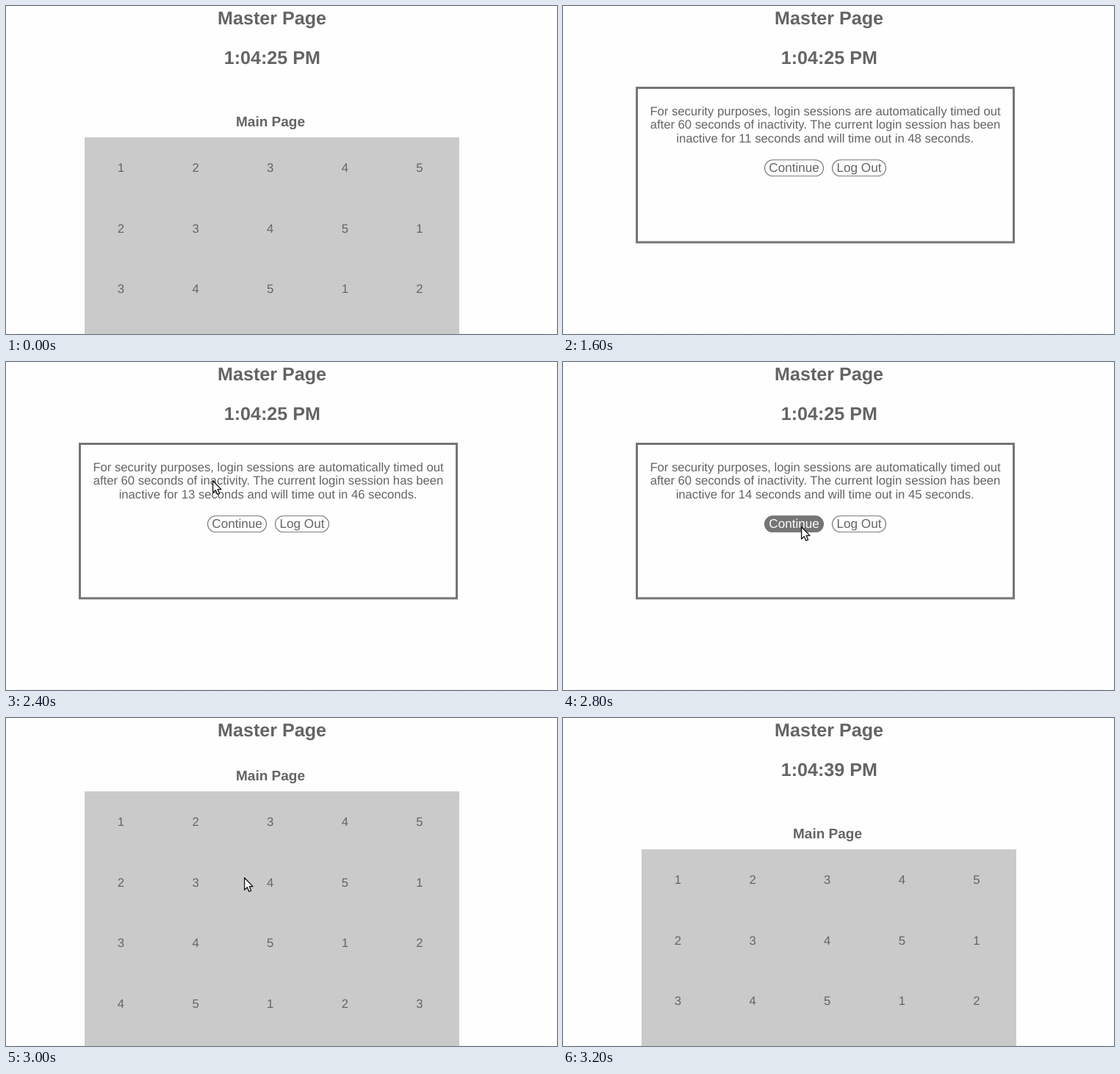
These frames come from a looping animation (750x447 px, 3.8 s). An HTML page:

```html
<!DOCTYPE html>
<html lang="en">
<head>
<meta charset="utf-8">
<title>Session timeout</title>
<style>
  html, body { margin: 0; width: 100%; height: 100%; overflow: hidden; background: #fefefe; }
  svg { display: block; width: 750px; height: 447px; }
  text {
    font: 16.65px "Liberation Sans", Arial, sans-serif;
    fill: #646464;
    text-anchor: middle;
    text-rendering: geometricPrecision;
  }
  .h1 { font-size: 25.1px; font-weight: bold; }
  .h3 { font-size: 19px; font-weight: bold; }
  .btn text { font-size: 17.1px; }
  .btn rect { fill: #fefefe; stroke: #757575; stroke-width: 1.1; }
  .hover rect { fill: #757575; }
  .hover text { fill: #fefefe; }
</style>
</head>
<body>
<svg viewBox="0 0 750 447">
  <text class="h1" x="362" y="25">Master Page</text>
  <text class="h1" id="clock" x="362.3" y="79"></text>

  <g id="page">
    <path d="M12 446.5H737" stroke="#f1f1f8"/>
    <g id="main">
      <text class="h3" x="360" y="164">Main Page</text>
      <rect x="107" y="179" width="510" height="420" fill="#cacaca"/>
      <g id="cells"></g>
    </g>
  </g>

  <g id="dialog">
    <path d="M11 446.5H738" stroke="#ececec" stroke-dasharray="2 1"/>
    <rect x="100.5" y="111.5" width="513" height="210.5" fill="#fefefe" stroke="#757575" stroke-width="3"/>
    <text x="357" y="148.5">For security purposes, login sessions are automatically timed out</text>
    <text x="357" y="167">after 60 seconds of inactivity. The current login session has been</text>
    <text id="count" x="356.7" y="186"></text>
    <g class="btn" id="go">
      <rect x="274.5" y="209.8" width="80" height="22" rx="11"/>
      <text x="314.5" y="226.2">Continue</text>
    </g>
    <g class="btn">
      <rect x="366.5" y="209.8" width="73" height="22" rx="11"/>
      <text x="403" y="226.2">Log Out</text>
    </g>
  </g>

  <path id="cursor" d="M.6 .8V17.2L4.3 13.8L6.8 19.5L9.6 18.3L7.2 12.6H12Z"
        fill="#fff" stroke="#111" stroke-width="1.3" stroke-linejoin="round"/>
</svg>
<script>
const $ = id => document.getElementById(id);
const show = (id, on) => $(id).setAttribute("visibility", on ? "visible" : "hidden");
const LOOP = 3800;

// Each step: start in ms, view, idle seconds, cursor tip
const steps = [
  [0, "full"],
  [800, "dialog", 10],
  [1600, "dialog", 11],
  [2000, "dialog", 12],
  [2300, "dialog", 13, [264, 130]],
  [2400, "dialog", 13, [281, 161]],
  [2500, "dialog", 13, [297, 187]],
  [2600, "dialog", 13, [312, 208]],
  [2700, "dialog", 14, [322, 221]],
  [2800, "dialog", 14, [324, 224]],
  [2900, "dialog", 14, [324, 217]],
  [3000, "short", 0, [324, 217]],
  [3100, "short"],
  [3200, "full"]
];

for (let row = 0; row < 5; row++) {
  for (let col = 0; col < 5; col++) {
    const cell = document.createElementNS("http://www.w3.org/2000/svg", "text");
    cell.setAttribute("x", 156.5 + col * 101.6);
    cell.setAttribute("y", 226 + row * 82.6);
    cell.textContent = (row + col) % 5 + 1;
    $("cells").append(cell);
  }
}

let last;
function draw(now) {
  const t = now % LOOP;
  const step = steps.filter(s => s[0] <= t).pop();
  if (step !== last) {
    const [start, view, idle, tip] = last = step;
    const open = view === "dialog";
    show("page", !open);
    show("dialog", open);
    show("clock", view !== "short");
    show("cursor", tip);
    $("clock").textContent = start < 3200 ? "1:04:25 PM" : "1:04:39 PM";
    $("main").setAttribute("transform", `translate(0 ${view === "short" ? -79 : 0})`);
    $("count").textContent = `inactive for ${idle} seconds and will time out in ${59 - idle} seconds.`;
    if (tip) $("cursor").setAttribute("transform", `translate(${tip})`);
    const over = tip && tip[0] > 274 && tip[0] < 355 && tip[1] > 209 && tip[1] < 232;
    $("go").classList.toggle("hover", Boolean(over));
  }
}

const begin = performance.now();
function tick() {
  draw(performance.now() - begin);
  requestAnimationFrame(tick);
}
tick();
</script>
</body>
</html>
```
